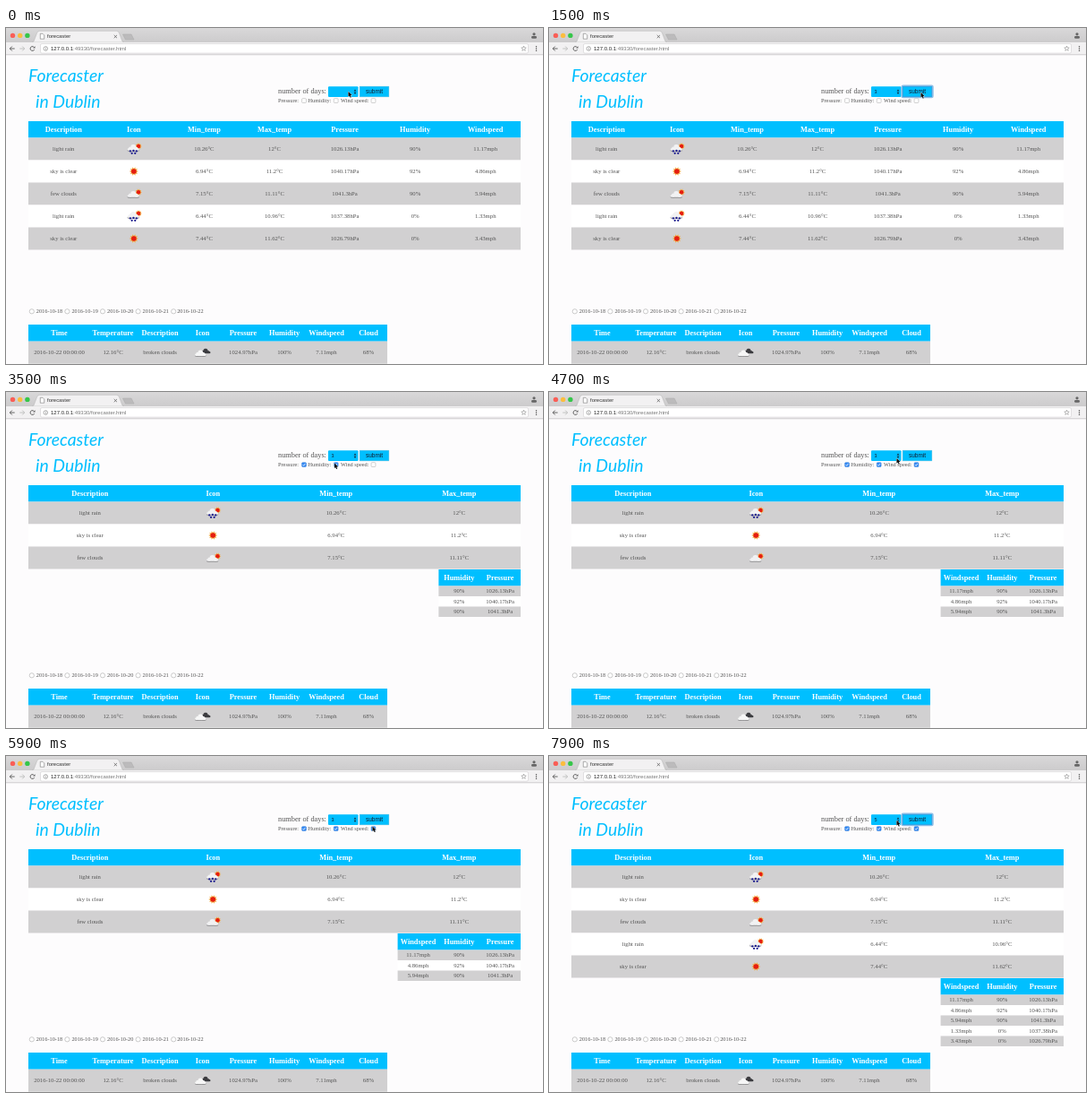
Write an HTML page with a canvas that moves like this. It is 600 px wide and 375 px high and loops after 8 s.

```html
<!DOCTYPE html>
<html lang="en">
<head>
<meta charset="utf-8">
<title>forecaster</title>
<style>
html, body { margin: 0; width: 100%; height: 100%; overflow: hidden; background: #fdfcfd; }
canvas { display: block; width: 600px; height: 375px; }
</style>
</head>
<body>
<canvas id="stage"></canvas>
<script>
const W = 600, H = 375, LOOP = 8000;
const canvas = document.getElementById('stage');
const ratio = window.devicePixelRatio || 1;
canvas.width = W * ratio;
canvas.height = H * ratio;
const ctx = canvas.getContext('2d');

const BLUE = '#00bfff', GRAY = '#d1d0d1', PAGE = '#fdfcfd', INK = '#555';
const SERIF = '"Liberation Serif", serif', SANS = '"Liberation Sans", sans-serif';
const BODY = '6.7px ' + SERIF, HEAD = 'bold 8.3px ' + SERIF;

const days = [
  ['light rain', 'rain', '10.26°C', '12°C', '1026.13hPa', '90%', '11.17mph'],
  ['sky is clear', 'sun', '6.94°C', '11.2°C', '1040.17hPa', '92%', '4.86mph'],
  ['few clouds', 'few', '7.15°C', '11.11°C', '1041.3hPa', '90%', '5.94mph'],
  ['light rain', 'rain', '6.44°C', '10.96°C', '1037.38hPa', '0%', '1.33mph'],
  ['sky is clear', 'sun', '7.44°C', '11.62°C', '1026.79hPa', '0%', '3.43mph']
];
const titles = ['Description', 'Icon', 'Min_temp', 'Max_temp', 'Pressure', 'Humidity', 'Windspeed'];

// Moments when the page changes
const at = { pick3: 800, focus1: 1400, show3: 1700, pressure: 2900, humidity: 3400,
  wind: 4100, pick5: 6000, focus2: 6200, show5: 6250 };

// Pointer stops: time, x, y
const stops = [
  [0, 382.5, 71], [400, 382.5, 71], [700, 377, 72], [850, 377, 72], [1300, 415.5, 72],
  [1700, 415.5, 72], [2100, 372.5, 79.5], [2700, 331.5, 79.5], [2950, 331.5, 79.5],
  [3300, 367, 79.5], [3600, 367, 79.5], [3950, 409.5, 79], [4250, 409.5, 79],
  [4650, 388.5, 74], [5300, 388.5, 74], [5800, 409.5, 78.5], [5950, 409.5, 78.5],
  [6150, 414, 72], [7300, 414, 72], [7750, 388.5, 72], [8000, 388.5, 72]
];

function rect(x, y, w, h, fill) {
  ctx.fillStyle = fill;
  ctx.fillRect(x, y, w, h);
}

function rounded(x, y, w, h, r, fill, stroke, line = 0.6) {
  ctx.beginPath();
  ctx.roundRect(x, y, w, h, r);
  if (fill) { ctx.fillStyle = fill; ctx.fill(); }
  if (stroke) { ctx.strokeStyle = stroke; ctx.lineWidth = line; ctx.stroke(); }
}

function dot(x, y, r, fill) {
  ctx.beginPath();
  ctx.arc(x, y, r, 0, Math.PI * 2);
  ctx.fillStyle = fill;
  ctx.fill();
}

function ring(x, y, r, stroke, line = 0.6, from = 0, to = Math.PI * 2) {
  ctx.beginPath();
  ctx.arc(x, y, r, from, to);
  ctx.strokeStyle = stroke;
  ctx.lineWidth = line;
  ctx.stroke();
}

function path(points, fill, stroke, line = 0.7) {
  ctx.beginPath();
  for (let i = 0; i < points.length; i += 2) ctx.lineTo(points[i], points[i + 1]);
  if (fill) { ctx.closePath(); ctx.fillStyle = fill; ctx.fill(); }
  if (stroke) { ctx.strokeStyle = stroke; ctx.lineWidth = line; ctx.stroke(); }
}

function text(str, x, y, font, fill = INK, align = 'left') {
  ctx.font = font;
  ctx.fillStyle = fill;
  ctx.textAlign = align;
  ctx.fillText(str, x, y);
}

function cloud(x, y, s, fill) {
  ctx.save();
  ctx.translate(x, y);
  ctx.scale(s, s);
  dot(-3.2, 0.6, 2, fill);
  dot(0, -0.8, 3, fill);
  dot(3.3, 0.7, 1.9, fill);
  rounded(-6.4, 0.2, 12.8, 2.6, 1.3, fill);
  ctx.restore();
}

function sun(x, y, r) {
  const rays = [];
  for (let i = 0; i < 20; i++) {
    const a = i * Math.PI / 10, d = i % 2 ? r * 0.62 : r;
    rays.push(x + d * Math.cos(a), y + d * Math.sin(a));
  }
  path(rays, '#f3a63a');
  dot(x, y, r * 0.56, '#e51d12');
}

function icon(kind, x, y) {
  if (kind === 'sun') return sun(x, y, 5);
  if (kind === 'broken') {
    cloud(x + 3.5, y - 1.3, 0.85, '#3c3c40');
    cloud(x - 2.2, y + 1.8, 0.98, '#8a8a8c');
    cloud(x - 2.2, y + 1, 0.98, '#f6f6f6');
    return;
  }
  const rain = kind === 'rain';
  sun(x + 5.2, y - (rain ? 3 : 1.8), 3.9);
  const cy = rain ? y - 1 : y + 1;
  cloud(x - 0.6, cy + 0.9, 1.02, '#929294');
  cloud(x - 0.6, cy, 1.02, '#f2f2f3');
  if (rain) {
    for (const [dx, dy] of [[-4, 2.4], [-0.4, 2], [3, 2.4], [-2.2, 4.8], [1.4, 4.8]])
      dot(x + dx, y + dy, 1.15, '#17178c');
  }
}

function table(x, y, widths, heads, rows, headH, rowH) {
  const total = widths.reduce((a, b) => a + b, 0);
  rect(x, y, total, headH, BLUE);
  rows.forEach((row, r) => rect(x, y + headH + r * rowH, total, rowH, r % 2 ? '#fff' : GRAY));
  let left = x;
  heads.forEach((head, c) => {
    const mid = left + widths[c] / 2;
    text(head, mid, y + headH / 2 + 2.7, HEAD, '#fff', 'center');
    rows.forEach((row, r) => {
      const cy = y + headH + (r + 0.5) * rowH;
      if (head === 'Icon') icon(row[c], mid, cy);
      else text(row[c], mid, cy + 2.1, BODY, INK, 'center');
    });
    left += widths[c];
  });
}

function chrome() {
  const strip = ctx.createLinearGradient(0, 0, 0, 16);
  strip.addColorStop(0, '#d9d8d9');
  strip.addColorStop(1, '#cccbcc');
  rect(0, 0, W, 16, strip);
  ['#f95f57', '#fbbd3e', '#35c649'].forEach((c, i) => dot(7.5 + i * 8.2, 8.4, 2.7, c));
  path([29, 16, 31, 15, 35, 4.5, 37, 3.3, 124, 3.3, 126, 4.5, 130, 15, 132, 16], '#f2f1f2', '#b3b2b3', 0.5);
  path([130.5, 7, 140, 7, 143, 13, 133.5, 13], '#bcbbbc', '#a9a8a9', 0.5);
  path([38.3, 6.3, 41, 6.3, 42.7, 8, 42.7, 12.2, 38.3, 12.2, 38.3, 6.3], '#fff', '#777', 0.6);
  text('forecaster', 46, 11.3, '5.9px ' + SANS, '#333');
  path([120.7, 7.9, 124, 11.2], null, '#555');
  path([120.7, 11.2, 124, 7.9], null, '#555');
  dot(590, 6.8, 1.6, '#666');
  rounded(587, 9, 6, 2.8, 1.4, '#666');

  rect(0, 16, W, 13.5, '#f2f1f2');
  rect(0, 29.5, W, 0.7, '#b9b8b9');
  for (const [x, d, c] of [[7, 1, '#555'], [18, -1, '#bbb']]) {
    path([x - 2.7, 23, x + 2.7, 23], null, c, 0.9);
    path([x - 0.2 * d, 20.5, x - 2.7 * d, 23, x - 0.2 * d, 25.5], null, c, 0.9);
  }
  ring(29.5, 23, 2.4, '#555', 0.9, 0.4, 5.6);
  path([30.2, 22.5, 32.5, 22.5, 32.5, 20.2], '#555');
  rounded(38.5, 17.6, 545, 10.5, 1.5, '#fff', '#c6c5c6', 0.5);
  ring(44.3, 23, 2.3, '#777');
  rect(44, 22.6, 0.6, 1.8, '#777');
  rect(44, 21.5, 0.6, 0.6, '#777');
  const font = '6px ' + SANS, host = '127.0.0.1';
  text(host, 50, 25.1, font, '#222');
  text(':49330/forecaster.html', 50 + ctx.measureText(host).width, 25.1, font, '#777');
  const star = [];
  for (let i = 0; i <= 10; i++) {
    const a = -Math.PI / 2 + i * Math.PI / 5, d = i % 2 ? 1.25 : 2.9;
    star.push(578.5 + d * Math.cos(a), 23 + d * Math.sin(a));
  }
  path(star, null, '#777', 0.5);
  for (let i = -1; i <= 1; i++) dot(592.5, 23 + i * 2.2, 0.75, '#555');
}

function check(x, on) {
  rounded(x - 2.4, 78.7, 4.8, 4.8, 0.9, on ? '#348af4' : '#fff', on ? '#2c76d2' : '#a5a5a5', 0.5);
  if (on) path([x - 1.3, 81.2, x - 0.4, 82.3, x + 1.4, 79.9], null, '#fff', 0.8);
}

function form(t, shown) {
  text('number of days:', 304, 73, '8.3px ' + SERIF);
  rounded(360, 65.2, 33.5, 11.8, 1, BLUE);
  const value = t < at.pick3 ? '' : t < at.pick5 ? '3' : '5';
  text(value, 363.6, 73.2, '5.4px ' + SANS, '#123');
  path([388.7, 70.6, 390, 68.5, 391.3, 70.6], '#123');
  path([388.7, 71.8, 390, 73.9, 391.3, 71.8], '#123');

  const focus = t >= at.focus1 && t < at.pressure || t >= at.focus2;
  if (focus) rounded(394.4, 64.4, 34.4, 13, 1.2, null, '#8dbde6', 1.8);
  rect(395, 65, 33, 12, BLUE);
  if (focus) rounded(395.4, 65.4, 32.2, 11.2, 0.5, null, '#3f9fdf', 0.8);
  else rounded(395.2, 65.2, 32.6, 11.6, 0, null, '#9ccbdc', 0.5);
  text('submit', 411.5, 73.2, '6.5px ' + SANS, '#102030', 'center');

  const small = '6.3px ' + SERIF;
  text('Pressure:', 304, 83, small);
  text('Humidity:', 337.5, 83, small);
  text('Wind speed:', 374, 83, small);
  check(333, shown.pressure);
  check(368.7, shown.humidity);
  check(410.5, shown.wind);
}

function radios() {
  for (let i = 0; i < 5; i++) {
    const x = 28.8 + i * 39.6;
    dot(x, 316.3, 2.6, '#fff');
    ring(x, 316.3, 2.6, '#999', 0.5);
    text('2016-10-' + (18 + i), x + (i < 4 ? 5 : 4), 318.3, '6.3px ' + SERIF);
  }
}

function pointer(t) {
  let i = 0;
  while (i < stops.length - 2 && t >= stops[i + 1][0]) i++;
  const [t0, x0, y0] = stops[i], [t1, x1, y1] = stops[i + 1];
  const k = (t - t0) / (t1 - t0), e = k * k * (3 - 2 * k);
  const x = x0 + (x1 - x0) * e, y = y0 + (y1 - y0) * e;
  const overLabel = y > 77.5 && (x < 330 || x > 337 && x < 364 || x > 372 && x < 406);
  if (overLabel) {
    path([x - 1.2, y - 3, x, y - 2.4, x + 1.2, y - 3], null, '#222', 0.7);
    path([x, y - 2.4, x, y + 3.4], null, '#222', 0.8);
    path([x - 1.2, y + 4, x, y + 3.4, x + 1.2, y + 4], null, '#222', 0.7);
    return;
  }
  ctx.save();
  ctx.translate(x, y);
  const arrow = [0, 0, 0, 5.6, 1.3, 4.5, 2.2, 6.6, 3.2, 6.2, 2.3, 4.1, 4, 4];
  ctx.lineJoin = 'round';
  path(arrow, '#111', '#fff', 0.7);
  path(arrow, '#111');
  ctx.restore();
}

function draw(t) {
  ctx.setTransform(ratio, 0, 0, ratio, 0, 0);
  ctx.textBaseline = 'alphabetic';
  rect(0, 0, W, H, PAGE);
  chrome();
  const title = 'italic 19.4px Lato, sans-serif';
  text('Forecaster', 25, 60, title, BLUE);
  text('in Dublin', 33, 89.2, title, BLUE);

  const shown = { pressure: t >= at.pressure, humidity: t >= at.humidity, wind: t >= at.wind };
  form(t, shown);

  const cols = t < at.show3 ? 7 : 4;
  const rows = t >= at.show3 && t < at.show5 ? days.slice(0, 3) : days;
  table(25, 104, Array(cols).fill(550 / cols), titles.slice(0, cols), rows, 18.5, 25);

  const extra = [];
  if (shown.wind) extra.push(6);
  if (shown.humidity) extra.push(5);
  if (shown.pressure) extra.push(4);
  if (extra.length) {
    table(575 - 45.8 * extra.length, 104 + 18.5 + rows.length * 25 + 0.5,
      extra.map(() => 45.8), extra.map(c => titles[c]),
      rows.map(row => extra.map(c => row[c])), 18.5, 11.5);
  }

  radios();
  table(25, 331, [69, 51, 54, 41, 50, 42, 52, 42],
    ['Time', 'Temperature', 'Description', 'Icon', 'Pressure', 'Humidity', 'Windspeed', 'Cloud'],
    [['2016-10-22 00:00:00', '12.16°C', 'broken clouds', 'broken', '1024.97hPa', '100%', '7.11mph', '68%']],
    18.7, 25);
  pointer(t);
}

const start = performance.now();
function tick(now) {
  draw(Math.max(0, now - start) % LOOP);
  requestAnimationFrame(tick);
}
draw(0);
requestAnimationFrame(tick);
</script>
</body>
</html>
```
